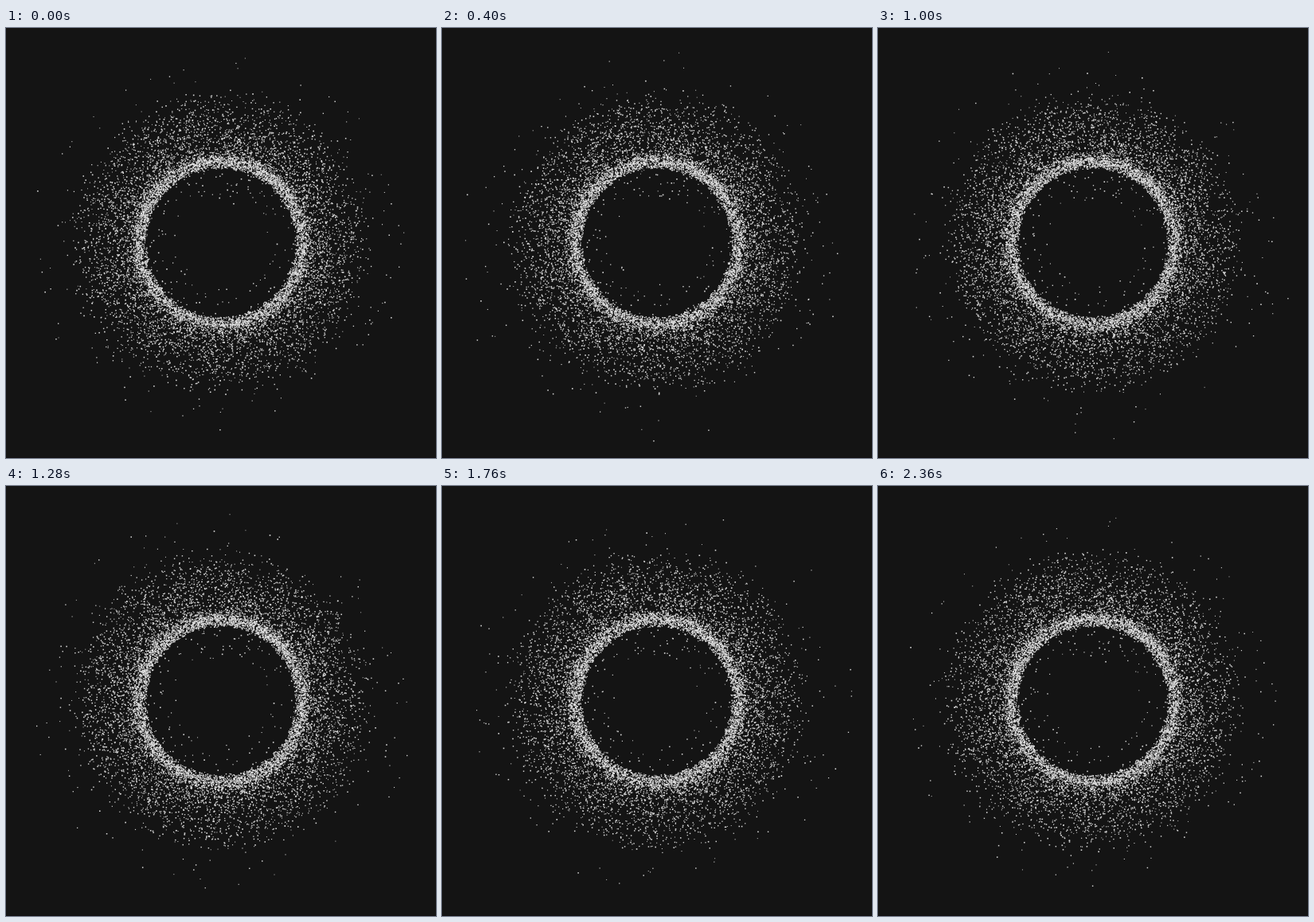
Recreate the animation shown at these times as an HTML page with a canvas. Size 540x540 px, loop 2400 ms.

```html
<!DOCTYPE html>
<html lang="en">
<head>
<meta charset="utf-8">
<title>Particle ring</title>
<style>
  html, body { margin: 0; width: 100%; height: 100%; overflow: hidden; background: #141414; }
  canvas { display: block; width: 540px; height: 540px; }
</style>
</head>
<body>
<canvas id="stage" width="540" height="540"></canvas>
<script>
const ctx = document.getElementById('stage').getContext('2d');
const SIZE = 540, LOOP = 2400, STEP = 40, TAU = Math.PI * 2;
const CX = 270, CY = 270;

let seed = 7319;
function rand() {
  seed = (seed + 0x6D2B79F5) | 0;
  let t = Math.imul(seed ^ (seed >>> 15), 1 | seed);
  t = (t + Math.imul(t ^ (t >>> 7), 61 | t)) ^ t;
  return ((t ^ (t >>> 14)) >>> 0) / 4294967296;
}

// Each layer has a particle count and a rule for the resting radius.
const layers = [
  { count: 3600, radius: () => 92.5 + 13 * (rand() + rand()) * (0.7 + 0.3 * rand()) },
  { count: 7200, radius: () => 94 + 125 * (1 - Math.sqrt(1 - 0.91 * rand())) },
  { count: 150, radius: () => 180 + 52 * Math.pow(rand(), 1.2) },
  { count: 130, radius: () => 92 - 36 * Math.pow(rand(), 1.2) }
];

function makeParticle(r) {
  const angle = rand() * TAU;
  return {
    x: CX + r * Math.cos(angle),
    y: CY + r * Math.sin(angle),
    sway: Math.min(20, 1.2 + Math.abs(r - 93) * 0.14),
    size: 0.9 + 0.75 * rand(),
    phases: [rand() * TAU, rand() * TAU, rand() * TAU, rand() * TAU]
  };
}

const particles = layers.flatMap(({ count, radius }) =>
  Array.from({ length: count }, () => makeParticle(radius())));

// Two harmonics form a closed, wandering path.
const drift = (t, p, q) => 0.8 * Math.sin(t + p) + 0.35 * Math.sin(2 * t + q);

function draw(ms) {
  const t = TAU * Math.floor((ms % LOOP) / STEP) * STEP / LOOP;
  ctx.fillStyle = '#141414';
  ctx.fillRect(0, 0, SIZE, SIZE);
  ctx.fillStyle = '#110f11';
  ctx.fillRect(0, SIZE - 1, SIZE, 1);
  ctx.fillStyle = 'rgba(226,226,226,0.95)';
  for (const { x, y, sway, size, phases: [a, b, c, d] } of particles) {
    ctx.fillRect(x + sway * drift(t, a, b) - size / 2,
                 y + sway * drift(t, c, d) - size / 2, size, size);
  }
}

function tick() {
  draw(performance.now());
  requestAnimationFrame(tick);
}
tick();
</script>
</body>
</html>
```
